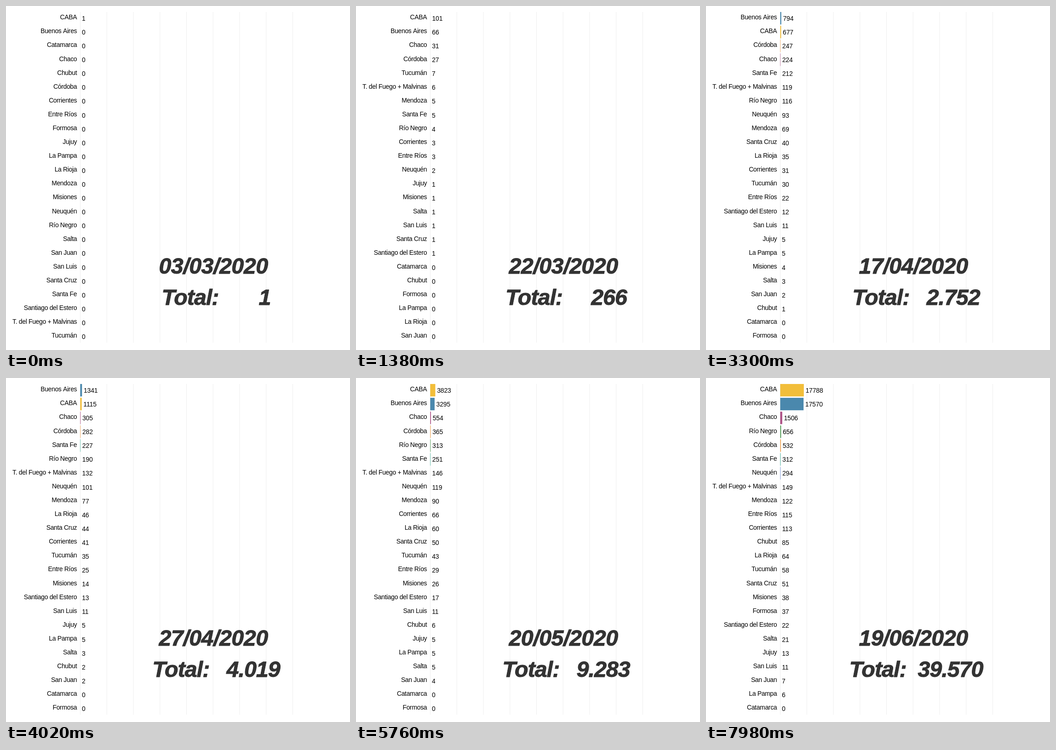
Recreate the animation shown at these times as an HTML page with a canvas. Size 748x748 px, loop 8 s.

```html
<!DOCTYPE html>
<html lang="es">
<head>
<meta charset="utf-8">
<title>Casos por provincia</title>
<style>
  html, body { margin: 0; width: 100%; height: 100%; overflow: hidden; background: #fff; }
  canvas { display: block; }
</style>
</head>
<body>
<canvas id="stage" width="748" height="748"></canvas>
<script>
const ctx = document.getElementById('stage').getContext('2d');
const LOOP = 8000, STEP = 60, LAST_DAY = 108;
const ROW = 30.09, BAR_X = 161.4, LABEL_X = 154.2, VALUE_X = 165.1;
const GRID = 57.75, SCALE = GRID / 20000, MIN_VISIBLE = 218;
const FAMILY = '"Liberation Sans", Arial, sans-serif';

const labelStyle = { font: '13.9px', spacing: '-0.3px', align: 'right', color: '#000' };
const valueStyle = { font: '13.9px', spacing: '-0.1px', align: 'left', color: '#000' };
const dateStyle = { font: 'italic bold 48.4px', spacing: '-0.5px', align: 'center', color: '#333', outline: 1 };
const totalStyle = { ...dateStyle, spacing: '-1px' };

// Cumulative cases on the survey days, in the order that breaks ties.
const surveyDays = [19, 30, 45, 65, 90, 108];
const surveys = {
  'CABA': [101, 345, 677, 1583, 8480, 17788],
  'Buenos Aires': [66, 316, 794, 1924, 6144, 17570],
  'Catamarca': [],
  'Chaco': [31, 99, 224, 392, 890, 1506],
  'Chubut': [0, 0, 1, 4, 10, 85],
  'Córdoba': [27, 117, 247, 320, 458, 532],
  'Corrientes': [3, 22, 31, 52, 94, 113],
  'Entre Ríos': [3, 16, 22, 28, 31, 115],
  'Formosa': [0, 0, 0, 0, 0, 37],
  'Jujuy': [1, 5, 5, 5, 6, 13],
  'La Pampa': [0, 3, 5, 5, 5, 6],
  'La Rioja': [0, 4, 35, 58, 63, 64],
  'Mendoza': [5, 25, 69, 85, 100, 122],
  'Misiones': [1, 3, 4, 25, 28, 38],
  'Neuquén': [2, 28, 93, 110, 137, 294],
  'Río Negro': [4, 9, 116, 268, 407, 656],
  'Salta': [1, 3, 3, 4, 11, 21],
  'San Juan': [0, 1, 2, 3, 5, 7],
  'San Luis': [1, 9, 11, 11, 11, 11],
  'Santa Cruz': [1, 21, 40, 49, 51, 51],
  'Santa Fe': [5, 152, 212, 244, 265, 312],
  'Santiago del Estero': [1, 3, 12, 15, 22, 22],
  'T. del Fuego + Malvinas': [6, 63, 119, 145, 149, 149],
  'Tucumán': [7, 21, 30, 41, 48, 58]
};
// Extra [day, cases] points where growth was uneven.
const extras = {
  'Salta': [89, 8], 'Mendoza': [17, 0], 'San Luis': [5, 1],
  'T. del Fuego + Malvinas': [12, 0], 'Tucumán': [12, 0]
};
const colors = {
  'CABA': '#f2be3a', 'Buenos Aires': '#4a88ad', 'Chaco': '#ad5085', 'Córdoba': '#f0a04a',
  'Río Negro': '#4f9a53', 'Santa Fe': '#35ab93', 'Neuquén': '#7090d8'
};

// National total every third day, plus a few days in between.
const totals = [1, 8, 17, 31, 56, 97, 225, 387, 690, 966, 1265, 1554, 1795, 2142, 2443, 2752,
  3031, 3435, 3892, 4285, 4681, 5020, 5611, 6278, 7134, 8068, 9283, 11353, 13228, 15419,
  17415, 20197, 22794, 25987, 30295, 34159, 39570].map((total, i) => [3 * i, total]);
totals.push([19, 266], [65, 5371], [89, 16851]);
totals.sort((a, b) => a[0] - b[0]);

const mix = (a, b, u) => a + (b - a) * u;

function bracket(points, day) {
  const i = Math.max(1, points.findIndex(p => p[0] >= day));
  return [points[i - 1], points[i]];
}

function totalOn(day) {
  const [a, b] = bracket(totals, day);
  return Math.round(a[1] * (b[1] / a[1]) ** ((day - a[0]) / (b[0] - a[0])));
}

const provinces = Object.keys(surveys).map((name, i) => {
  const points = surveyDays.map((day, k) => [day, surveys[name][k] || 0]);
  points.unshift([0, i ? 0 : 1]);
  if (extras[name]) points.push(extras[name]);
  return { name, points: points.sort((a, b) => a[0] - b[0]) };
});

// Each province grows in step with the national total.
function casesOn(points, day) {
  const [a, b] = bracket(points, day);
  const start = totalOn(a[0]);
  return Math.round(mix(a[1], b[1], (totalOn(day) - start) / (totalOn(b[0]) - start)));
}

const days = Array.from({ length: LAST_DAY + 1 }, (_, day) => {
  const cases = provinces.map(p => casesOn(p.points, day));
  const ranks = [];
  cases.map((_, i) => i)
    .sort((a, b) => cases[b] - cases[a] || a - b)
    .forEach((province, rank) => { ranks[province] = rank; });
  return { cases, ranks, total: totalOn(day) };
});

// About every fourth day change has one halfway frame.
const timeline = [];
const halfways = day => Math.floor(day * 0.2355);
for (let day = 0; day <= LAST_DAY; day++) {
  if (day && halfways(day) > halfways(day - 1)) timeline.push(day - 0.5);
  timeline.push(day);
}

function text(string, x, y, style) {
  ctx.font = `${style.font} ${FAMILY}`;
  ctx.letterSpacing = style.spacing;
  ctx.textAlign = style.align;
  ctx.fillStyle = ctx.strokeStyle = style.color;
  ctx.fillText(string, x, y);
  if (style.outline) {
    ctx.lineWidth = style.outline;
    ctx.strokeText(string, x, y);
  }
}

function draw(moment) {
  const day = Math.ceil(moment);
  const from = days[Math.floor(moment)], to = days[day];
  const tween = (key, i) => (from[key][i] + to[key][i]) / 2;

  ctx.fillStyle = '#fff';
  ctx.fillRect(0, 0, 748, 748);
  ctx.fillStyle = '#eee';
  for (let i = 0; i < 9; i++) ctx.fillRect(161 + i * GRID, 13, 1, 719);

  provinces.forEach(({ name }, i) => {
    const y = tween('ranks', i) * ROW;
    const cases = tween('cases', i);
    if (cases > MIN_VISIBLE) {
      ctx.fillStyle = colors[name] || '#999';
      ctx.fillRect(BAR_X, 13 + y, cases * SCALE, 27.1);
    }
    text(name, LABEL_X, 29.3 + y, labelStyle);
    text(to.cases[i], VALUE_X + cases * SCALE, 31.9 + y, valueStyle);
  });

  const date = new Date(Date.UTC(2020, 2, 3 + day)).toISOString().slice(0, 10);
  const total = String(to.total).replace(/\B(?=(\d{3})+$)/g, '.');
  text(date.split('-').reverse().join('/'), 451, 582, dateStyle);
  text('Total: ' + total.padStart(7), 457, 650, totalStyle);
}

function tick() {
  const frame = Math.floor(performance.now() % LOOP / STEP);
  draw(timeline[Math.min(frame, timeline.length - 1)]);
  requestAnimationFrame(tick);
}
ctx.lineJoin = 'round';
tick();
</script>
</body>
</html>
```
